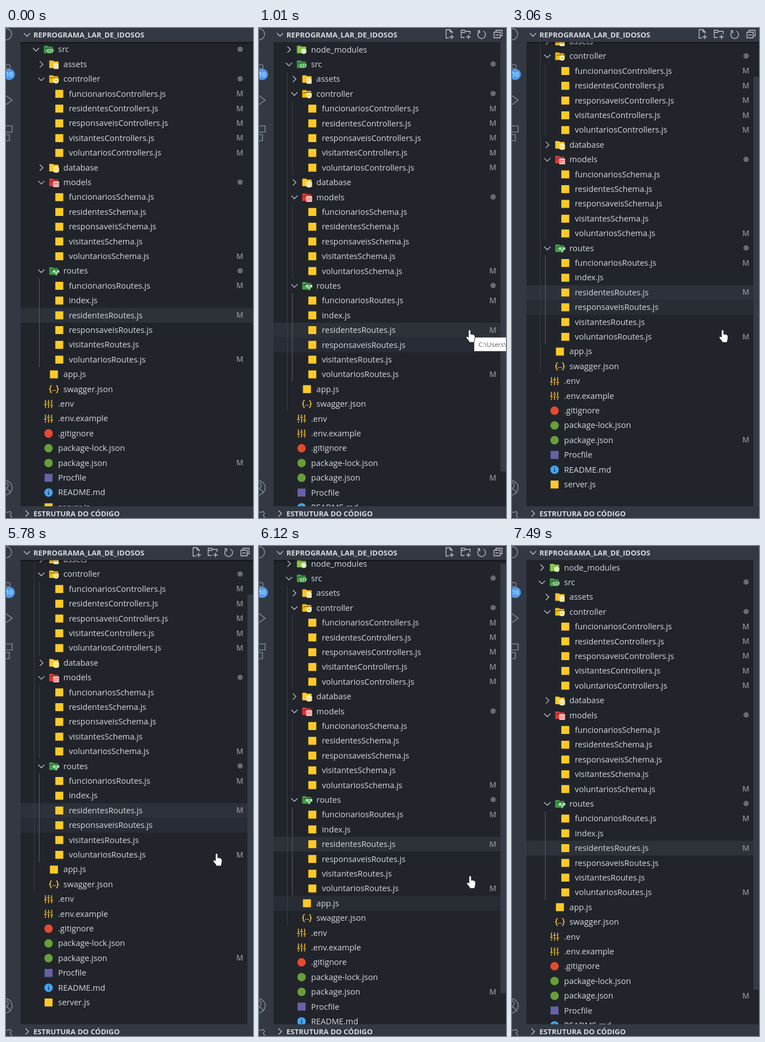
Recreate the animation shown at these times as an HTML page. Size 441 px wide and 876 px high, loop 7910 ms.

```html
<!DOCTYPE html>
<html lang="pt">
<head>
<meta charset="utf-8">
<style>
  html, body { margin: 0; width: 100%; height: 100%; overflow: hidden; background: #21252b; }
  svg { display: block; position: absolute; left: 0; top: 0; }
  text { font-family: "Open Sans", sans-serif; white-space: pre; }
  .label { font-size: 14.5px; fill: #d7dae0; }
  .title { font-size: 13px; font-weight: 700; fill: #d7dae0; }
  .mark { font-size: 13.5px; font-weight: 600; fill: #8d9097; text-anchor: middle; }
  .line { fill: none; stroke: #c5c8ce; stroke-width: 1.3; }
  .side { fill: none; stroke: #7c828d; stroke-width: 1.7; }
  .panel { fill: #333842; }
</style>
</head>
<body>
<svg width="441" height="876">
  <defs>
    <clipPath id="view"><rect x="26" y="25" width="415" height="830"/></clipPath>
    <linearGradient id="shade" x2="0" y2="1">
      <stop stop-color="#000" stop-opacity=".45"/><stop offset="1" stop-color="#000" stop-opacity="0"/>
    </linearGradient>
  </defs>
  <g clip-path="url(#view)">
    <g id="tree"></g>
    <rect id="shadow" x="26" y="25" width="415" height="4" fill="url(#shade)"/>
    <rect id="bar" x="431" y="25" width="10" height="768" fill="#363c46"/>
  </g>

  <g class="panel">
    <rect width="441" height="25"/>
    <rect y="855" width="441" height="21"/>
    <rect width="26" height="876"/>
  </g>
  <g id="chevrons"></g>
  <text class="title" x="49" y="17">REPROGRAMA_LAR_DE_IDOSOS</text>
  <text class="title" x="49" y="873">ESTRUTURA DO CÓDIGO</text>

  <g id="actions" class="line">
    <path d="M339 18h-5V3h7l4 4v3M341 3v4h4M344 12v8M340 16h8"/>
    <path d="M367 17h-6V4h6l2 2h8v5M361 8h6l2-2M374 12v8M370 16h8"/>
    <path d="M393 6.5a7 7 0 1 0 7.5-1M390 5h4v4.5"/>
    <path d="M423 7V4h11v10h-3M419.5 7.5h11v10h-11zM422 12.5h6"/>
  </g>

  <g class="side">
    <circle cy="11" r="10"/>
    <circle cx="3.5" cy="69" r="4"/>
    <path d="M0 121l11 8-11 8M0 175h11v11H0M0 190.5h6v11H0"/>
    <circle cx="-2" cy="822" r="13"/>
    <circle cx="-1" cy="818" r="5"/>
    <path d="M-1 824q7 1 8 7M0 865l4 1 3-2 3 4-3 3 3 3-2 4"/>
  </g>
  <circle cx="6" cy="83" r="10" fill="#4d9bf0"/>
  <text x="6" y="87" font-size="10.5" fill="#fff" text-anchor="middle">10</text>

  <g id="tip">
    <rect x="384.5" y="553.5" width="70" height="24" fill="#fff" stroke="#b8b8b8"/>
    <text x="392" y="570" font-size="11.5" fill="#575757">C:\Users\</text>
  </g>
  <path id="hand" fill="#fff" stroke="#111" stroke-width=".8"
    d="M-2 1Q0-2 2 1V8Q4 6 5 8Q7 7 8 9Q10 9 9.5 15L8 22H-1V20L-6 14Q-6 9-2 13Z"/>
</svg>
<script>
const ROW = 26.4, TOP = 25.3, LOOP = 7910, FRAME = 70;
const $ = id => document.getElementById(id);

const closedFolder = 'M2 4h8l2 2h10v14H2z';
const openFolder = 'M2 20V4h8l2 2h9v2H4v10l2-8h17l-3 10z';
const fill = (d, color) => `<path d="${d}" fill="${color}" stroke="${color}" stroke-linejoin="round"/>`;
const stroke = (d, color, width = 2) => `<path d="${d}" fill="none" stroke="${color}" stroke-width="${width}"/>`;
const square = color => `<path d="M3 3h18v18H3z" fill="${color}"/>`;
const disc = (color, r = 9.5, x = 12, y = x) => `<circle cx="${x}" cy="${y}" r="${r}" fill="${color}"/>`;
const yellow = '#fbc02d', amber = '#ffca28', cream = '#fff3c4', green = '#43a047', mint = '#c8e6c9';

const icons = {
  modules: fill(closedFolder, '#8bc34a') + disc('#dcedc8', 6, 17, 16),
  src: fill(openFolder, green) + stroke('M13 11l-4 4 4 4M19 11l4 4-4 4M17 10l-2 10', mint, 1.7),
  assets: fill(closedFolder, yellow) + fill('M12 10h7l3 3v9H12z', cream) + stroke('M14 15h6M14 18h6', yellow, 1),
  controller: fill(openFolder, '#ffc107') + disc(cream, 6, 17, 16) + disc('#ffc107', 2.3, 17, 16),
  database: fill(closedFolder, amber) + fill('M11 12q6-4 12 0v9q-6 4-12 0z', cream) +
    stroke('M11 14q6 3 12 0M11 18q6 3 12 0', amber, 1.3),
  models: fill(openFolder, '#e53935') + fill('M11 10h12v12H11z', '#ffcdd2') + stroke('M12 14h10M12 18h10', '#e53935', 1.4),
  routes: fill(openFolder, green) + stroke('M17 22v-5l-5-5M17 17l5-5M11 16v-5h5M18 11h5v5', mint),
  js: square(amber),
  json: stroke('M7 4Q4 4 4 8t-3 4q3 0 3 4t3 4M17 4q3 0 3 4t3 4q-3 0-3 4t-3 4M8 15h2m1 0h2m1 0h2', yellow),
  env: stroke('M5 3v10m0 4v4M12 3v4m0 4v10M19 3v10m0 4v4M2 14h6M9 9h6M16 15h6', yellow),
  git: disc('#e64a30'),
  node: disc('#689f38'),
  proc: square('#6762a6'),
  info: disc('#42a5f5') + stroke('M12 11v6M12 7v2', '#21252b')
};

// level, name, icon, mark (M or dot), chevron (v open, > closed)
const people = ['funcionarios', 'residentes', 'responsaveis', 'visitantes', 'voluntarios'];
const files = (kind, marked) => people.map(name => [3, name + kind + '.js', 'js', marked.includes(name) ? 'M' : '']);
const routes = files('Routes', ['funcionarios', 'residentes', 'voluntarios']);
routes.splice(1, 0, [3, 'index.js', 'js']);
const openDir = name => [2, name, name, 'dot', 'v'];
const closedDir = name => [2, name, name, '', '>'];
const rootFiles = {
  '.env': 'env', '.env.example': 'env', '.gitignore': 'git', 'package-lock.json': 'node',
  'package.json': 'node', 'Procfile': 'proc', 'README.md': 'info', 'server.js': 'js'
};
const rows = [
  [1, 'node_modules', 'modules', '', '>'],
  [1, 'src', 'src', 'dot', 'v'],
  closedDir('assets'),
  openDir('controller'), ...files('Controllers', people),
  closedDir('database'),
  openDir('models'), ...files('Schema', ['voluntarios']),
  openDir('routes'), ...routes,
  [2, 'app.js', 'js'],
  [2, 'swagger.json', 'json'],
  ...Object.entries(rootFiles).map(([name, icon]) => [1, name, icon, name === 'package.json' ? 'M' : ''])
];
const rowOf = name => rows.findIndex(row => row[1] === name);

const rowTop = i => TOP + i * ROW;
const band = (i, color, id) => `<rect id="${id}" x="26" y="${rowTop(i)}" width="415" height="${ROW}" fill="${color}"/>`;
const chevron = (x, y, open) =>
  `<path class="line" transform="translate(${x} ${y}) rotate(${open ? 90 : 0})" d="M-2.7-5.5L2.8 0l-5.5 5.5"/>`;

// A guide runs beside everything nested below a folder.
function guide(name, color) {
  const from = rowOf(name), level = rows[from][0];
  const to = rows.findIndex((row, i) => i > from && row[0] <= level);
  return `<path d="M${level * 9 + 41.5} ${rowTop(from + 1)}V${rowTop(to)}" stroke="${color}"/>`;
}

function drawRow([level, name, icon, mark, arrow], i) {
  const indent = (level - 1) * 9.6, y = rowTop(i) + ROW / 2;
  return `<g transform="translate(${66.5 + indent} ${y - 9.5}) scale(.79)">${icons[icon]}</g>
    <text class="label" x="${93 + indent}" y="${y + 5}">${name}</text>` +
    (arrow ? chevron(53.5 + indent, y, arrow === 'v') : '') +
    (mark === 'dot' ? `<circle cx="418" cy="${y - .5}" r="4.8" fill="#686b70"/>` : '') +
    (mark === 'M' ? `<text class="mark" x="417.5" y="${y + 4.5}">M</text>` : '');
}

$('chevrons').innerHTML = chevron(37.5, 12, true) + chevron(37.5, 868, false);
$('tree').innerHTML = band(rowOf('residentesRoutes.js'), '#2c313a', 'selected') + band(0, '#282c34', 'hover') +
  `<g id="guides">${['src', 'controller', 'models'].map(name => guide(name, '#393e47')).join('')}</g>` +
  guide('routes', '#585d66') + rows.map(drawRow).join('');

// Each track lists [start time, value]; values hold until the next start.
const ENTER = 200, LEAVE = 6930;
const scrollTrack = [[0, 26.4], [410, 18], [480, 7], [610, 0], [2660, 60], [3060, 67.2], [6120, 7], [6450, 2], [6520, 0]];
const handTrack = [[0, [418, 575]], [270, [390, 552]], [340, [376, 540]], [5780, [376, 550]], [5850, [376, 576]], [5920, [377, 590]]];
const hoverTrack = [[0, ''], [270, 'responsaveisRoutes.js'], [5850, 'voluntariosRoutes.js'], [5920, 'app.js'], [LEAVE, '']];

const at = (track, time) => track.findLast(([from]) => from <= time)[1];
const ramp = (time, from) => time < from ? 0 : Math.min(1, (Math.floor((time - from) / FRAME) + 1) / 3);
const move = (id, x, y) => $(id).setAttribute('transform', `translate(${x} ${y})`);
const fade = (id, amount) => $(id).setAttribute('opacity', Number(amount));

function render(time) {
  const scroll = at(scrollTrack, time), hover = at(hoverTrack, time);
  const inside = time >= ENTER && time < LEAVE;
  move('tree', 0, -scroll);
  move('bar', 0, scroll * 830 / 897.6);
  move('hand', ...at(handTrack, time));
  move('hover', 0, rowOf(hover) * ROW);
  fade('hover', hover !== '');
  fade('hand', inside);
  fade('actions', inside);
  fade('guides', ramp(time, ENTER) - ramp(time, LEAVE));
  fade('bar', ramp(time, ENTER));
  fade('tip', time >= 1010 && time < 2660);
  fade('shadow', scroll > 0);
}

const start = performance.now();
function tick() {
  render((performance.now() - start) % LOOP);
  requestAnimationFrame(tick);
}
tick();
</script>
</body>
</html>
```
